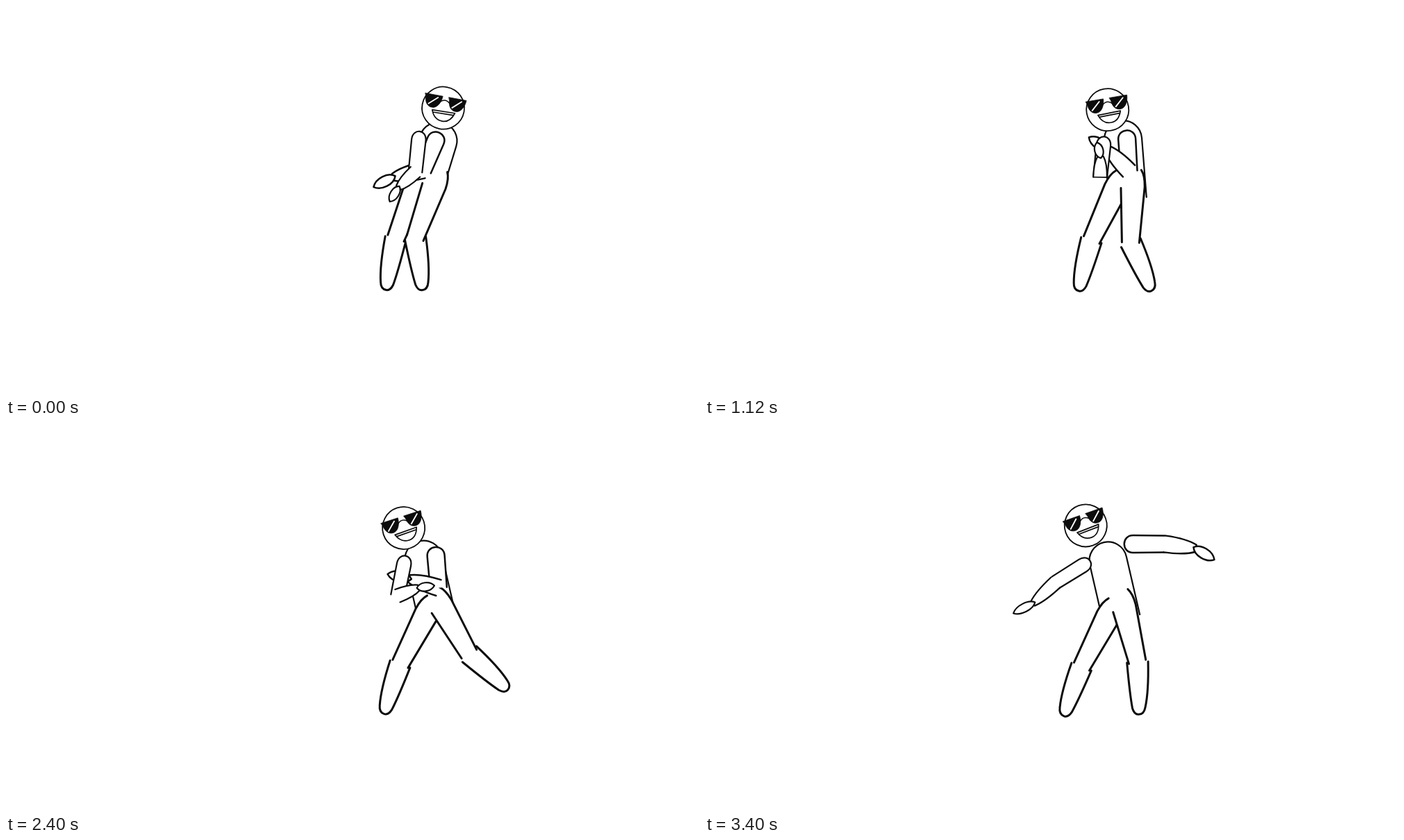
These frames come from a looping animation (998 px wide and 561 px high, 3.44 s). An HTML page with a canvas:

```html
<!DOCTYPE html>
<html lang="en">
<head>
<meta charset="utf-8">
<title>Dancer</title>
<style>
html, body { margin: 0; width: 100%; height: 100%; overflow: hidden; background: #fff; }
canvas { display: block; }
</style>
</head>
<body>
<canvas id="stage" width="998" height="561"></canvas>
<script>
const ctx = document.getElementById('stage').getContext('2d');
const LOOP = 3440, STEP = 40;
const INK = '#0c0c0c';
const THIGH_LEN = 105, UPPER_LEN = 48, FOREARM_LEN = 44;

const P = d => new Path2D(d);
const TORSO = P('M-27 74L-27 0A27 27 0 0 1 27 0L27 86');
const THIGH = P('M12 0Q17.5 8 17.7 24L12.5 105H-12.5L-16.5 27Z');
const THIGH_LINE = P('M12 0Q17.5 8 17.7 24L12.5 105M-16.5 27L-12.5 105');
const SHIN = P('M-15 1C-13 30 -10 58 -8.5 67Q-6 76 0 76Q8 76 10 66C14 50 15.5 25 15.5 0');
const UPPER = P('M-12 48L-12.5 2C-12.5 -15 12.5 -15 12.5 2L12 48');
const FOREARM = P('M-12 0C-12 18 -10 34 -5 45H5C10 34 12 18 12 0');
const CUFF = P('M-12 0H12');
const HAND = P('M0 -3C10 4 10 24 0 32C-10 24 -10 4 0 -3Z');
const FACE = P('M30.5 0A30.5 30.5 0 1 1 -30.5 0A30.5 30.5 0 1 1 30.5 0Z');
const LENS = P('M-13 -10L12.5 -10C12 0 7 8.5 0 8.5C-7 8.5 -11 3 -11.5 -5Z');
const GLINT = P('M-6 4L6 -7');
const BRIDGE = P('M-6 -8Q1 -14.5 8 -8');
const MOUTH = P('M-15 5.5L18 4.5C15 14 9 19 2 19C-6 19 -12 14 -15 5.5ZM-13 8.5L16 7.8');

const rad = deg => deg * Math.PI / 180;
const easeOut = k => 1 - (1 - k) ** 1.7;

// Angles are in degrees from straight down, positive to the right.
function tip(x, y, a, len) {
  return [x + Math.sin(rad(a)) * len, y + Math.cos(rad(a)) * len];
}

function place(path, x, y, a, sx, sy) {
  const out = new Path2D();
  out.addPath(path, new DOMMatrix().translate(x, y).rotate(-a).scale(sx, sy));
  return out;
}

function draw(path, x, y, a, { width = 2, fill = '#fff', line = path, color = INK, sx = 1, sy = 1 } = {}) {
  if (fill) {
    ctx.fillStyle = fill;
    ctx.fill(place(path, x, y, a, sx, sy));
  }
  ctx.lineWidth = width;
  ctx.strokeStyle = color;
  ctx.stroke(place(line, x, y, a, sx, sy));
}

function drawLeg(x, y, thigh, shin, side) {
  draw(SHIN, ...tip(x, y, thigh, THIGH_LEN), shin, { width: 3, sx: side });
  draw(THIGH, x, y, thigh, { width: 3, line: THIGH_LINE, sx: side });
}

function drawArm(x, y, upper, fore, hand, { girth = 1, reach = 1, width = 2.5 } = {}) {
  const elbow = tip(x, y, upper, UPPER_LEN);
  const wrist = tip(...elbow, fore, FOREARM_LEN * reach);
  draw(UPPER, x, y, upper, { width, sx: girth });
  draw(FOREARM, ...elbow, fore, { width, sx: girth, sy: reach });
  const folded = Math.cos(rad(fore)) < -0.9;
  if (folded && girth < 1) draw(CUFF, ...elbow, fore, { width: 1.6, fill: null, sx: girth });
  draw(HAND, ...wrist, hand, { width, sx: girth, sy: reach });
}

function drawHead(x, y, a) {
  draw(FACE, x, y, a, { width: 1.8 });
  draw(BRIDGE, x, y, a, { width: 1.5, fill: null });
  for (const offset of [-16, 18.5]) {
    const lens = tip(...tip(x, y, a + 90, offset), a, -6.5);
    draw(LENS, ...lens, a, { width: 0.8, fill: INK });
    draw(GLINT, ...lens, a, { width: 1.9, fill: null, color: '#fff' });
  }
  draw(MOUTH, x, y, a, { width: 1.7 });
}

function render(t) {
  const ramp = (from, to) => Math.min(1, Math.max(0, (t - from) / (to - from)));

  // Overlapping movements, each going from 0 to 1
  const age = ramp(0, 3400);
  const settle = ramp(0, 2120);
  const turn = ramp(0, 1560);
  const fold = ramp(0, 680);
  const unfold = ramp(680, 1560);
  const lift = ramp(1560, 2120);
  const kick = ramp(680, 2560);
  const land = ramp(2560, 3400);
  const open = ramp(2120, 3400);
  const cross = ramp(2120, 2640);
  const spread = ramp(2640, 3400);
  const relax = ramp(2640, 2960);

  const x = 612 - 6 * settle + 14 * ramp(2120, 2560) - 26 * easeOut(land);
  const y = 236.5 + 5.5 * settle + 16 * ramp(2120, 2800) - 7.5 * ramp(2800, 3400);
  const chestX = x + 10.5 - 24 * turn;
  const chestY = y - 42 - 10 * settle;

  ctx.fillStyle = '#fff';
  ctx.fillRect(0, 0, 998, 561);
  ctx.lineCap = ctx.lineJoin = 'round';

  draw(TORSO, chestX, chestY, -17 + 30 * turn, { width: 2.2 });

  // The pelvis turns with the kicking leg.
  const thigh = -19.5 + 6.5 * fold + 47.5 * kick - 20.5 * land;
  const hipX = 6 - 0.27 * thigh;
  const hipY = 1 + 7 * age;
  drawLeg(x - hipX, y + hipY, -22 - 6 * easeOut(ramp(0, 2560)), -10.5 - 9 * ramp(0, 2960), -1);
  drawLeg(x + hipX + 1, y - hipY, thigh, 7.7 + 7 * fold + 35 * kick - 48.5 * land, 1);

  const neck = 8.5 - 41 * easeOut(turn);
  const neckLen = 48 + 12 * ramp(1560, 3400);
  drawHead(...tip(chestX, chestY, 180 - neck, neckLen), -10.5 + 28 * turn + 2 * open);

  const foreR = -77 - 59 * fold - 21 * lift + 92 * cross + 147 * spread;
  drawArm(
    chestX - 3 + 16 * settle + 21 * open,
    chestY - 2 - 22 * open,
    -23 + 37 * turn - 25 * lift + 29 * cross + 72 * spread,
    foreR,
    foreR + 14 - 37 * open);

  const foreL = -47 - 134 * fold - 126 * cross - 100 * spread;
  drawArm(
    chestX - 28 - 7 * relax,
    chestY - 3 + 14 * turn - 10 * cross + 5 * spread,
    -6 - 10 * cross - 42 * spread,
    foreL,
    foreL + 15 - 53 * cross + 22 * spread,
    { girth: 0.82, reach: 0.75 - 0.23 * fold + 0.3 * unfold - 0.17 * cross + 0.35 * relax, width: 2.2 });
}

const start = performance.now();
function tick() {
  const t = (performance.now() - start) % LOOP;
  render(Math.floor(t / STEP) * STEP);
  requestAnimationFrame(tick);
}
tick();
</script>
</body>
</html>
```
